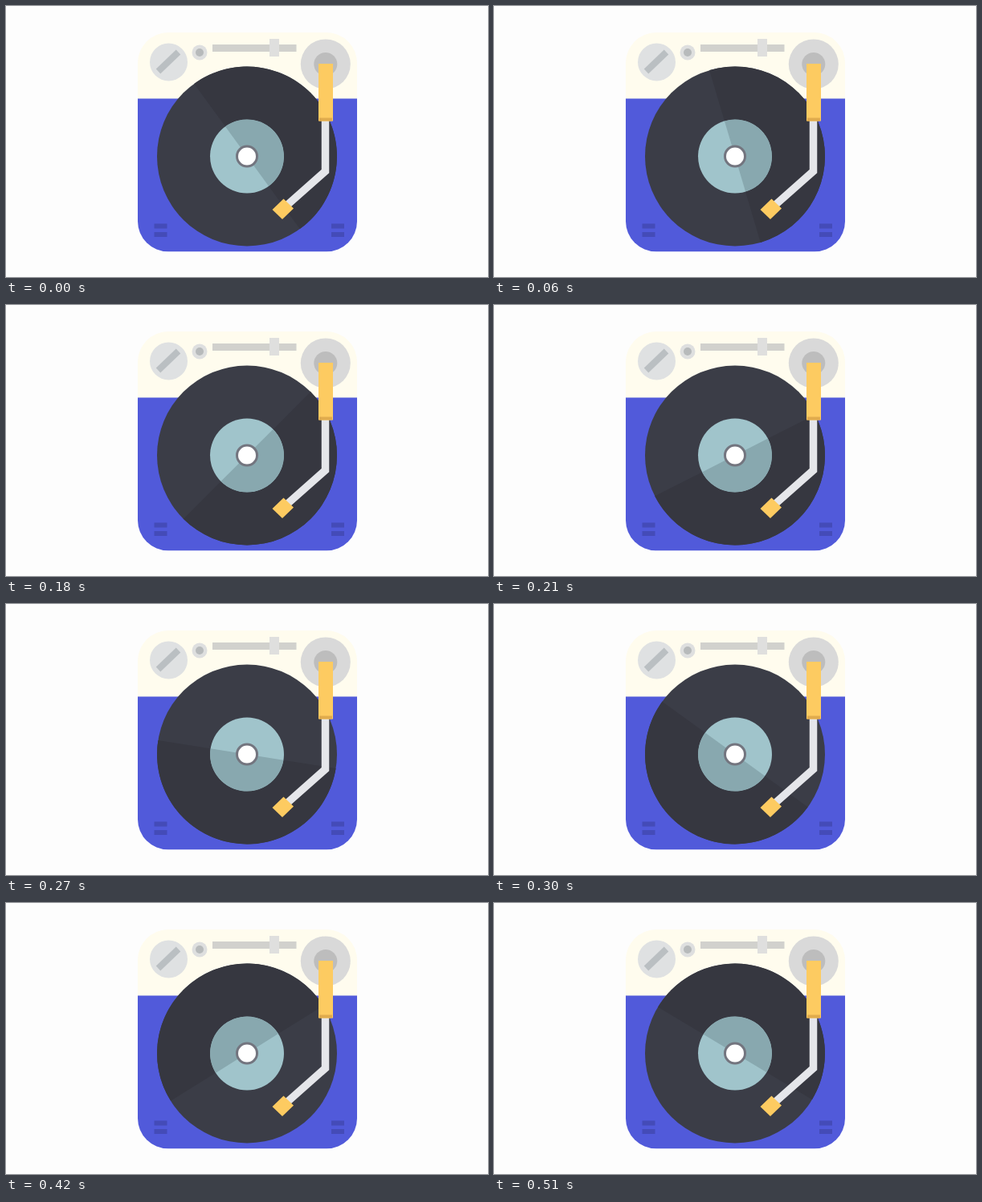
An HTML page for the animation above (0.54 s loop, 600 px wide and 338 px high).

```html
<!DOCTYPE html>
<html lang="en">
<head>
<meta charset="utf-8">
<title>Turntable</title>
<style>
  html, body { margin: 0; width: 100%; height: 100%; overflow: hidden; background: #fdfdfd; }
  svg { display: block; width: 100%; height: 100%; }
</style>
</head>
<body>
<svg viewBox="0 0 600 338">
  <clipPath id="case"><rect x="164" y="33" width="273" height="273.5" rx="38"/></clipPath>
  <g clip-path="url(#case)">
    <path fill="#fffcee" d="M164 33h273v83H164z"/>
    <path fill="#515ada" d="M164 115.5h273v191H164z"/>
  </g>

  <!-- controls -->
  <circle cx="202.500" cy="70" r="23.500" fill="#dfe1e2"/>
  <path d="M189.500 81.500L214.500 57.500" stroke="#babfc2" stroke-width="8"/>
  <circle cx="241" cy="58" r="9.500" fill="#dedfdf"/>
  <circle cx="241" cy="58" r="5" fill="#b7babb"/>
  <path fill="#d1d1cd" d="M257 48h104.500v9H257z"/>
  <path fill="#dfdfde" d="M328 41h12v22h-12z"/>
  <circle cx="397.800" cy="72.500" r="31" fill="#d9d9d9"/>
  <circle cx="397.800" cy="72.500" r="14.500" fill="#bdbdbd"/>
  <path fill="#444bb8" d="M184.500 271.500h16v6h-16zm0 10.500h16v6h-16zM405 271.500h16v6h-16zm0 10.500h16v6h-16z"/>

  <!-- record -->
  <g transform="translate(300 187.500)">
    <circle r="112" fill="#3b3d47"/>
    <circle r="46" fill="#a0c4cb"/>
    <g id="shade">
      <path fill="#363740" d="M0-112a112 112 0 0 1 0 224V46a46 46 0 0 0 0-92z"/>
      <path fill="#88a8af" d="M0-46a46 46 0 0 1 0 92z"/>
    </g>
    <circle r="12.500" fill="#fff" stroke="#73757f" stroke-width="3"/>
  </g>

  <!-- tone arm -->
  <path d="M397.500 140V206L348 250" fill="none" stroke="#e5e6ea" stroke-width="9.500"/>
  <path fill="#fdcb61" d="M389 72h18v71.500h-18z"/>
  <path fill="#e0ab4d" d="M390 139.500h16v4h-16z"/>
  <path fill="#fdcb61" d="M345.500 240.500L358 252.500 344 266 331.500 254z"/>
</svg>
<script>
  const LOOP = 540, STEP = 30;
  // [time in ms, angle in degrees] of the shaded half
  const keys = [[0, -36], [120, 3], [180, 45], [270, 99], [360, 180], [420, 238], [510, 301], [540, 324]];
  const shade = document.getElementById('shade');

  function angleAt(t) {
    const i = keys.findIndex(key => key[0] > t);
    const [t0, a0] = keys[i - 1], [t1, a1] = keys[i];
    return a0 + (a1 - a0) * (t - t0) / (t1 - t0);
  }

  function draw(now) {
    const t = Math.floor(now % LOOP / STEP) * STEP;
    shade.setAttribute('transform', `rotate(${angleAt(t)})`);
    requestAnimationFrame(draw);
  }
  draw(0);
</script>
</body>
</html>
```
